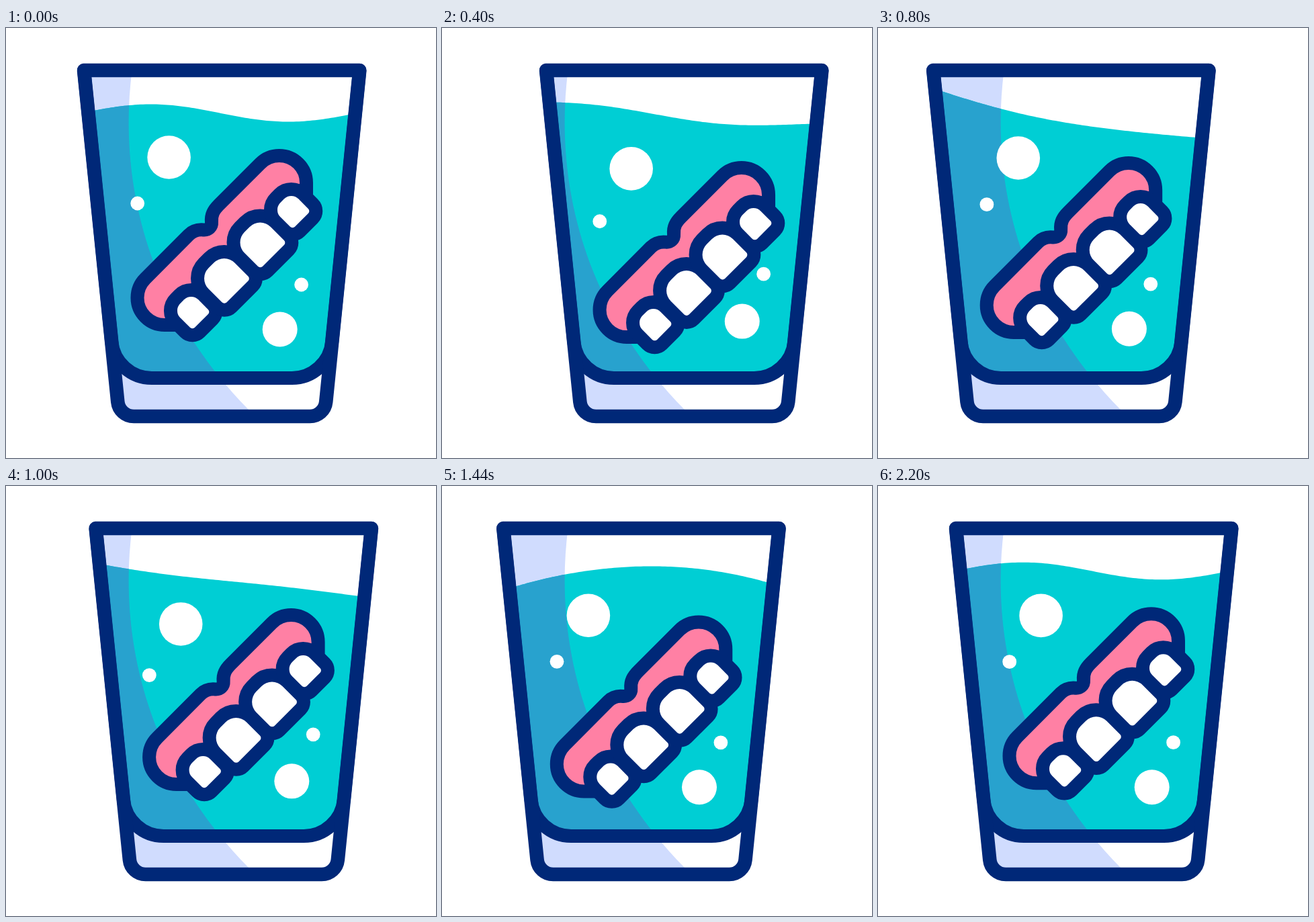
An HTML page with a canvas for the animation above (2.24 s loop, 640 by 640 pixels).

```html
<!DOCTYPE html>
<html lang="en">
<head>
<meta charset="utf-8">
<title>Dentures in a glass</title>
<style>
html, body { margin: 0; width: 100%; height: 100%; overflow: hidden; background: #fff; }
canvas { display: block; width: 640px; height: 640px; }
</style>
</head>
<body>
<canvas id="stage" width="640" height="640"></canvas>
<script>
const ctx = document.getElementById('stage').getContext('2d');
const LOOP = 2240;
const NAVY = '#002878', TEAL = '#00ced4', SHADE = '#28a2ce', LILAC = '#d0dcfe', PINK = '#ff80a4';

// Eased value between keys given as [time, value]
function ease(keys, t) {
  for (let i = 1; i < keys.length; i++) {
    const [t0, a] = keys[i - 1], [t1, b] = keys[i];
    if (t <= t1) {
      const u = (t - t0) / (t1 - t0);
      return a + (b - a) * u * u * (3 - 2 * u);
    }
  }
  return keys[keys.length - 1][1];
}

// Swings between 0 and 1, turning at each given time
const swing = times => [0, ...times].map((t, i) => [t, i % 2]);

// The glass swings sideways and settles
const glassX = [[0, 0], [360, 43.4], [680, -53], [1040, 20], [1400, -26], [1760, 10], [2160, 0]];
const teethY = swing([510, 1120, 1680, LOOP]);
const bob = swing([380, 745, 1120, 1465, 1810, LOOP]);

const bubbles = [
  { x: 242.6, y: 192.5, r: 32.3, amp: 17 },
  { x: 195.7, y: 261, r: 10.4, amp: 27 },
  { x: 439.6, y: 382, r: 10.4, amp: -16 },
  { x: 407.7, y: 448.5, r: 26, amp: -12 }
];

// The water surface is a tilted, bent line with one ripple on it
const water = {
  level: [[0, 126.5], [300, 126.5], [800, 147], [1440, 119.5], [LOOP, 126.5]],
  tilt: [[0, 0], [800, 32], [1440, 4], [LOOP, 0]],
  bend: [[0, 0], [300, 0], [800, -13], [1440, 31], [LOOP, 0]],
  ripple: [[0, 13], [900, -2], [1700, 0], [LOOP, 13]]
};

function waterPath(t) {
  const [level, tilt, bend, ripple] = Object.values(water).map(keys => ease(keys, t));
  ctx.beginPath();
  for (let x = 40; x <= 600; x += 4) {
    const s = (x - 320) / 200;
    const wave = Math.sin((x - 318) * 2 * Math.PI / 410);
    ctx.lineTo(x, level + tilt * s + bend * s * s + ripple * wave);
  }
  ctx.lineTo(600, 600);
  ctx.lineTo(40, 600);
  ctx.closePath();
}

function glassPath() {
  ctx.beginPath();
  ctx.moveTo(321, 63);
  ctx.lineTo(526.3, 63);
  ctx.arcTo(474, 578, 321, 578, 24);
  ctx.arcTo(168.5, 578, 116, 63, 24);
  ctx.lineTo(116, 63);
  ctx.closePath();
}

function basinPath() {
  ctx.beginPath();
  ctx.moveTo(526.3, 63);
  ctx.arcTo(479.8, 521, 321, 521, 60);
  ctx.arcTo(162.7, 521, 116, 63, 60);
  ctx.lineTo(116, 63);
}

// Shadow that stays still while the glass moves
function shadePath() {
  ctx.beginPath();
  ctx.moveTo(0, 60);
  ctx.lineTo(188, 60);
  ctx.bezierCurveTo(169, 200, 194, 398, 362, 569);
  ctx.lineTo(380, 590);
  ctx.lineTo(0, 590);
}

function clipAt(dx, path) {
  ctx.translate(dx, 0);
  path();
  ctx.clip();
  ctx.translate(-dx, 0);
}

function fill(color) {
  ctx.fillStyle = color;
  ctx.fill();
}

function stroke(width) {
  ctx.lineWidth = width;
  ctx.strokeStyle = NAVY;
  ctx.stroke();
}

const small = { w: 19, r: 15, d: 25.6 }, large = { w: 27.5, r: 22, d: 33.3 };
const teeth = [
  { x: 272.8, y: 417.8, ...small }, { x: 320.9, y: 368.9, ...large },
  { x: 374.4, y: 315.4, ...large }, { x: 421.8, y: 267.8, ...small }
];

function toothPath({ x, y, w, r, d }) {
  ctx.save();
  ctx.translate(x, y);
  ctx.rotate(-Math.PI / 4);
  ctx.beginPath();
  ctx.roundRect(-w, -r, 2 * w, r + d, [r, r, 5, 5]);
  ctx.restore();
}

function drawTeeth() {
  const q = Math.PI / 4;
  ctx.beginPath();
  ctx.moveTo(256, 442);
  ctx.arc(236, 401.5, 40.5, 2 * q, 5 * q);
  ctx.lineTo(272, 308);
  ctx.bezierCurveTo(279, 301, 287, 299.8, 294, 300.5);
  ctx.bezierCurveTo(301, 301, 306.5, 296, 306, 289);
  ctx.bezierCurveTo(305, 278, 309, 271, 317, 263);
  ctx.arc(406.7, 230.3, 40.3, -3 * q, 0);
  ctx.lineTo(447, 247);
  fill(PINK);
  stroke(20);
  for (const tooth of teeth) { toothPath(tooth); stroke(40); }
  for (const tooth of teeth) { toothPath(tooth); fill('#fff'); }
}

function draw(t) {
  const dx = ease(glassX, t);
  ctx.fillStyle = '#fff';
  ctx.fillRect(0, 0, 640, 640);
  ctx.lineJoin = ctx.lineCap = 'round';

  ctx.save();
  clipAt(dx, glassPath);
  shadePath();
  fill(LILAC);
  clipAt(dx, basinPath);
  waterPath(t);
  fill(TEAL);
  ctx.clip();
  shadePath();
  fill(SHADE);
  ctx.restore();

  ctx.save();
  ctx.translate(dx, 0);
  for (const b of bubbles) {
    ctx.beginPath();
    ctx.arc(b.x, b.y + b.amp * ease(bob, t), b.r, 0, 2 * Math.PI);
    fill('#fff');
  }
  basinPath();
  stroke(20);
  glassPath();
  stroke(20.6);
  ctx.translate(0, 20.5 * ease(teethY, t));
  drawTeeth();
  ctx.restore();
}

const start = performance.now();
function tick(now) {
  draw(Math.max(0, now - start) % LOOP);
  requestAnimationFrame(tick);
}
draw(0);
requestAnimationFrame(tick);
</script>
</body>
</html>
```
